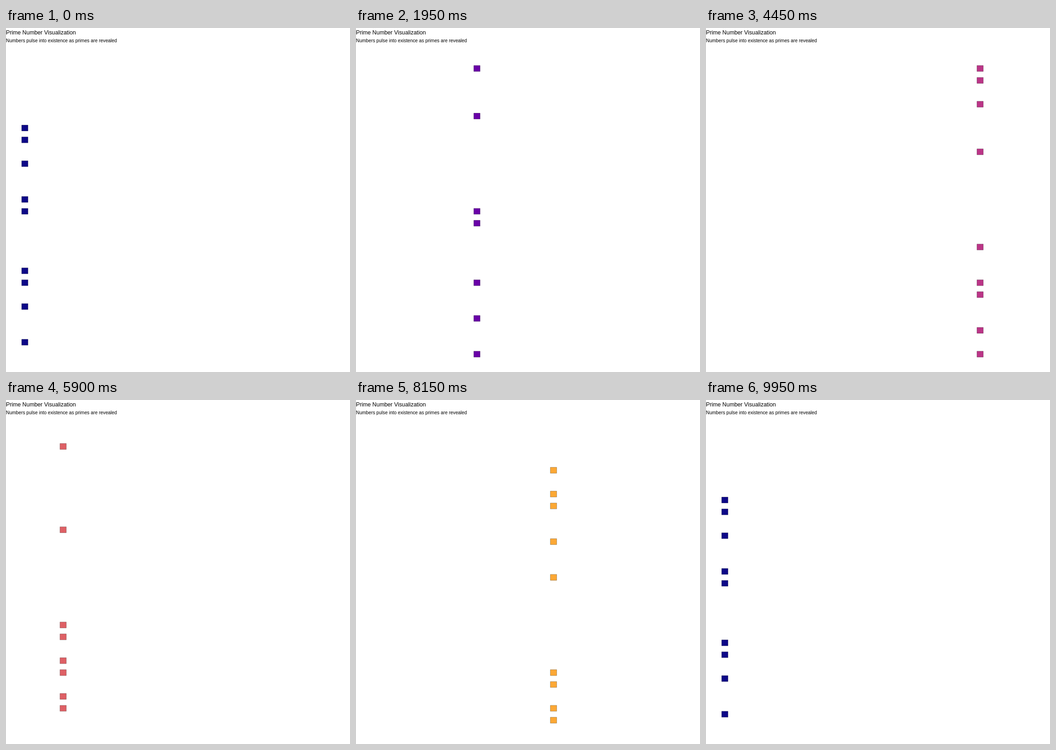
An HTML page for the animation above (10000 ms loop, 748 by 748 pixels).

```html
<!DOCTYPE html>
<html lang="en">
<head>
<meta charset="utf-8">
<title>Prime Number Visualization</title>
<style>
  html, body { margin: 0; width: 100%; height: 100%; overflow: hidden; background: #fff; }
  svg { display: block; width: 100%; height: 100%; }
  text { font-family: "Liberation Sans", Arial, sans-serif; fill: #000; }
</style>
</head>
<body>
<svg viewBox="0 0 748 748" xmlns="http://www.w3.org/2000/svg">
  <rect width="748" height="748" fill="#fff"/>
  <text x="0" y="14.4" font-size="12.34">Prime Number Visualization</text>
  <text x="0" y="31" font-size="10.24">Numbers pulse into existence as primes are revealed</text>
  <path id="tiles" stroke="#000" stroke-width="0.3"/>
</svg>
<script>
const LOOP = 10000, TICK = 50;
const LIMIT = 2500, COLS = 50, CYCLE = 100;
const TILE_W = 748 / 53.9, TILE_H = 12.94;
const LEFT = 2.45 * TILE_W, BOTTOM = 715.65;
const PLASMA = ('0D0887 2D0594 44039E 5901A5 6F00A8 8305A7 9512A1 A72197 B6308B C5407E ' +
  'D14E72 DD5E66 E76E5B EF7F4F F79143 FBA238 FEB72D FDCD26 F7E225 F0F921')
  .split(' ').map(hex => [0, 2, 4].map(i => parseInt(hex.substr(i, 2), 16)));

const tiles = document.getElementById('tiles');

function isPrime(n) {
  for (let d = 2; d * d <= n; d++) if (n % d === 0) return false;
  return n > 1;
}

function plasma(u) {
  const p = u * (PLASMA.length - 1);
  const i = Math.min(Math.floor(p), PLASMA.length - 2);
  const mix = PLASMA[i].map((c, k) => Math.round(c + (PLASMA[i + 1][k] - c) * (p - i)));
  return `rgb(${mix})`;
}

function tilePath(n) {
  const x = LEFT + (n % COLS - 1) * TILE_W;
  const y = BOTTOM - (Math.floor(n / COLS) + 1) * TILE_H;
  return `M${x.toFixed(2)} ${y.toFixed(2)}h${TILE_W.toFixed(3)}v${TILE_H}h${-TILE_W.toFixed(3)}z`;
}

// One state per remainder modulo 100 that holds any prime
const groups = Array.from({ length: CYCLE }, () => []);
for (let n = 2; n <= LIMIT; n++) if (isPrime(n)) groups[n % CYCLE].push(n);
const states = groups.filter(g => g.length).map((g, i, all) => ({
  path: g.map(tilePath).join(''),
  fill: plasma(i / (all.length - 1))
}));

// Ticks each state stays on screen
const holds = states.map((_, i) => i === 0 || i === 20 || i > 32 ? 4 : 5);

function stateAt(ms) {
  let tick = Math.floor(ms / TICK);
  for (let i = 0; i < holds.length; i++) {
    if (tick < holds[i]) return i;
    tick -= holds[i];
  }
  return 0;
}

let shown = -1;
function render(ms) {
  const i = stateAt(ms % LOOP);
  if (i === shown) return;
  shown = i;
  tiles.setAttribute('d', states[i].path);
  tiles.setAttribute('fill', states[i].fill);
}

const start = performance.now();
function loop() {
  render(performance.now() - start);
  requestAnimationFrame(loop);
}
loop();
</script>
</body>
</html>
```
